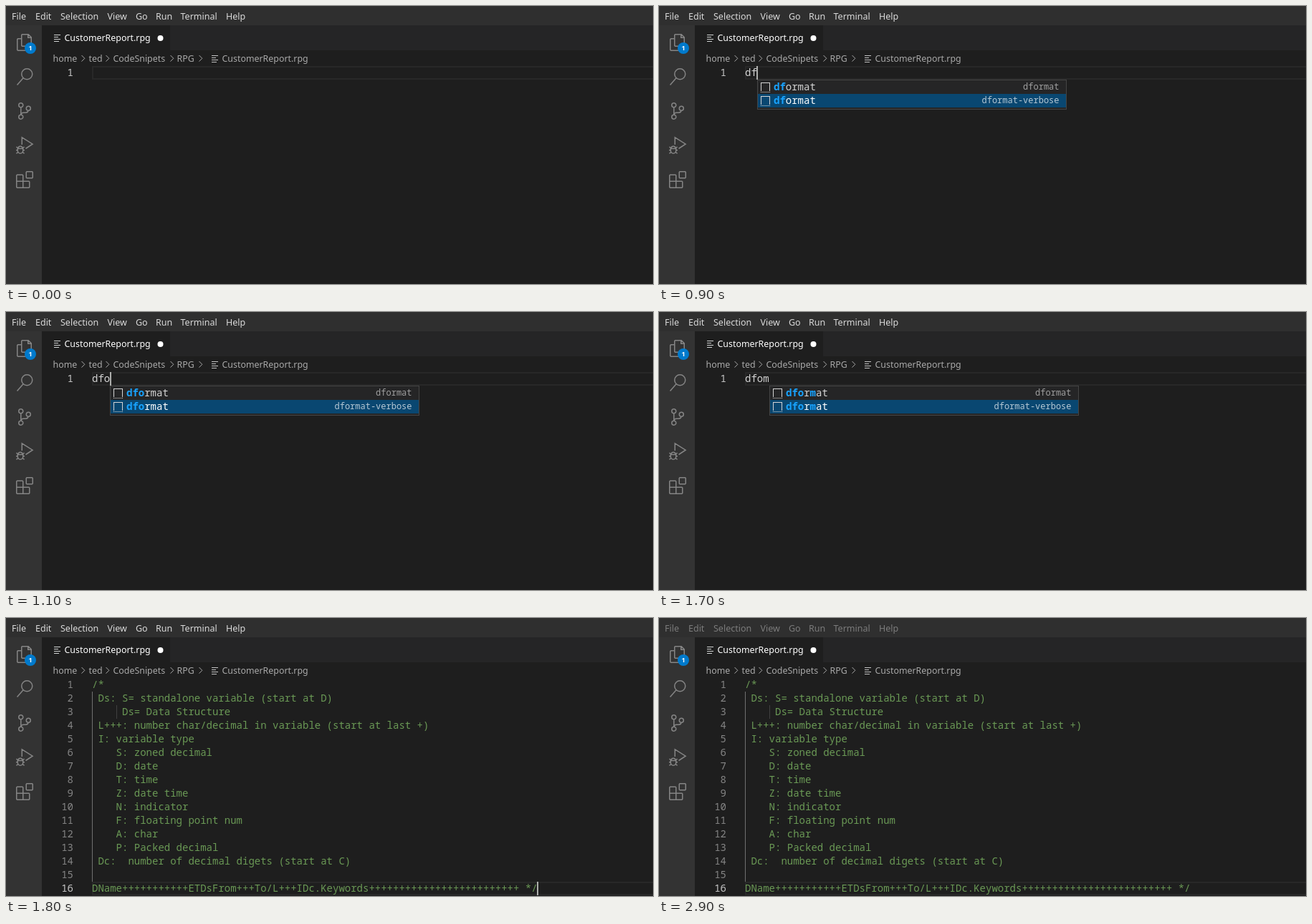
These frames come from a looping animation (903 by 389 pixels, 3 s). An HTML page with a canvas:

```html
<!DOCTYPE html>
<html lang="en">
<head>
<meta charset="utf-8">
<title>Editor snippet</title>
<style>
html, body { margin: 0; width: 100%; height: 100%; overflow: hidden; background: #1e1e1e; }
canvas { display: block; }
</style>
</head>
<body>
<canvas id="stage" width="903" height="389"></canvas>
<script>
const ctx = document.getElementById('stage').getContext('2d', { alpha: false });
const W = 903, H = 389, LOOP = 3000;
const LEFT = 120, TOP = 84, LINE = 19, BASE = 14, CHAR = 8.4;
const UI = '"Noto Sans", "Open Sans", sans-serif';
const MONO = '"Noto Sans Mono", "DejaVu Sans Mono", monospace';
const FILE = 'CustomerReport.rpg';

const STEPS = [
  { at: 0, typed: '', caret: false },
  { at: 500, typed: 'd', caret: true },
  { at: 900, typed: 'df', caret: true },
  { at: 1100, typed: 'dfo', caret: true },
  { at: 1200, typed: 'dfom', caret: true },
  { at: 1700, typed: 'dfom', caret: false },
  { at: 1800, done: true, caret: true },
  { at: 2300, done: true, caret: false },
  { at: 2800, done: true, caret: true },
  { at: 2900, done: true, caret: false, blurred: true }
];

const SNIPPET = [
  '/*',
  ' Ds: S= standalone variable (start at D)',
  '     Ds= Data Structure',
  ' L+++: number char/decimal in variable (start at last +)',
  ' I: variable type',
  '    S: zoned decimal',
  '    D: date',
  '    T: time',
  '    Z: date time',
  '    N: indicator',
  '    F: floating point num',
  '    A: char',
  '    P: Packed decimal',
  ' Dc:  number of decimal digets (start at C)',
  '',
  'DName' + '+'.repeat(11) + 'ETDsFrom+++To/L+++IDc.Keywords' + '+'.repeat(25) + ' */'
];

const ITEMS = [
  ['dformat', 'dformat'],
  ['dformat', 'dformat-verbose'],
  ['do', 'do'],
  ['dow', 'dow']
];

const MENU = [
  ['File', 8], ['Edit', 41], ['Selection', 76], ['View', 141.5],
  ['Go', 181], ['Run', 209], ['Terminal', 243.5], ['Help', 307]
];

const CRUMBS = [['home', 65.5], ['ted', 115.5], ['CodeSnipets', 149.5], ['RPG', 238.5], [FILE, 301.5]];

// Side bar icons, each on a 24 unit grid
const ICONS = [
  'M8.5.75h8.7l4.05 4.05v11.8l-.8.65H8.6l-.85-.85V1.5zM16.75.75v4.5h4.5' +
    'M7.75 6.75H2.6l-.85.85v14.9l.9.75h12l.6-.7v-5.3',
  'M7.75 8.25a7.5 7.5 0 1 0 15 0a7.5 7.5 0 1 0-15 0M9.8 14.1L1.56 23.4',
  'M3.8 3.75a3 3 0 1 0 6 0a3 3 0 1 0-6 0M3.8 20.2a3 3 0 1 0 6 0a3 3 0 1 0-6 0' +
    'M14.27 8.2a3 3 0 1 0 6 0a3 3 0 1 0-6 0M6.8 6.75v10.5' +
    'M17.2 11.2c-.5 1.9-1.8 3-3.7 3h-3c-2 0-3.4 1.2-3.6 3',
  'M8.25 11V.75L23.1 10.2L13.5 16.5' +
    'M2.25 16.5v3C2.6 21.7 4.2 23.25 6 23.25S9.4 21.7 9.75 19.5v-3z' +
    'M3 16.2a3 3 0 0 1 6 0M.5 14l2.2 2.2M11.5 14l-2.2 2.2' +
    'M0 18.75h2.25M9.75 18.75H12M.5 23.5l2-2M11.5 23.5l-2-2',
  'M15 .75h7.5l.75.75V9l-.75.75H15L14.25 9V1.5z' +
    'M.75 14.25V6l.75-.75H9l.75.75v17.25M.75 14.25H18l.75.75v7.5l-.75.75H1.5l-.75-.75z'
].map(d => new Path2D(d));

function box(x, y, w, h, color) {
  ctx.fillStyle = color;
  ctx.fillRect(x, y, w, h);
}

function text(str, x, y, font, color, align = 'left') {
  ctx.font = font;
  ctx.fillStyle = color;
  ctx.textAlign = align;
  ctx.fillText(str, x, y);
}

function disc(x, y, r, color) {
  ctx.fillStyle = color;
  ctx.beginPath();
  ctx.arc(x, y, r, 0, Math.PI * 2);
  ctx.fill();
}

function fileIcon(x, y, color) {
  [9, 6, 9, 7].forEach((w, i) => box(x, y + i * 3, w, 1, color));
}

function sideBar() {
  box(0, 27, 50, H - 27, '#333333');
  ctx.strokeStyle = '#858585';
  ctx.lineWidth = 1.5;
  ICONS.forEach((icon, i) => {
    ctx.save();
    ctx.translate(14, 39 + i * 48);
    ctx.stroke(icon);
    ctx.restore();
  });
  disc(34, 59, 8, '#007acc');
  text('1', 34, 62.3, '600 9px ' + UI, '#ffffff', 'center');
}

function header(blurred) {
  box(0, 0, W, 27, '#2f2f2f');
  for (const [name, x] of MENU) text(name, x, 19, '12.5px ' + UI, blurred ? '#7c7c7c' : '#dadada');

  box(50, 27, W - 50, 35, '#252526');
  box(50, 27, 179, 35, '#1e1e1e');
  fileIcon(67, 40, '#d4d7d6');
  text(FILE, 81.5, 49, '12.4px ' + UI, '#ffffff');
  disc(215.5, 45, 4, '#ffffff');

  for (const [name, x] of CRUMBS) text(name, x, 78, '12.4px ' + UI, '#a9a9a9');
  fileIcon(287, 69, '#c5c5c5');
  ctx.strokeStyle = '#a9a9a9';
  ctx.lineWidth = 1;
  for (const x of [105.5, 139.5, 229.5, 269.5]) {
    ctx.beginPath();
    ctx.moveTo(x, 69);
    ctx.lineTo(x + 4.3, 73.3);
    ctx.lineTo(x, 77.6);
    ctx.stroke();
  }
}

function editor(lines, color, caret) {
  const last = lines.length - 1;
  const y = TOP + last * LINE;
  box(LEFT, y, W - LEFT, LINE, '#282828');
  box(LEFT + 2, y + 2, W - LEFT - 2, LINE - 4, '#1e1e1e');

  if (last > 0) {
    box(LEFT, TOP + LINE, 1, (last - 1) * LINE, '#707070');
    box(LEFT + 34, TOP + 2 * LINE, 1, LINE, '#404040');
  }
  lines.forEach((line, i) => {
    const base = TOP + i * LINE + BASE;
    text(i + 1, 94, base, '14px ' + MONO, i === last ? '#c6c6c6' : '#858585', 'right');
    text(line, LEFT, base, '14px ' + MONO, color);
  });
  if (caret) box(Math.floor(LEFT + lines[last].length * CHAR), y, 2, LINE, '#aeafad');
}

function snippetIcon(x, y) {
  const color = '#d4d4d4';
  box(x, y, 13, 1, color);
  box(x, y, 1, 12, color);
  box(x + 12, y, 1, 12, color);
  for (let i = 0; i < 7; i++) box(x + i * 2, y + 13, 1, 1, color);
}

// Bolds the letters that the typed word matches in order
function label(word, typed, x, y, color) {
  let hit = 0;
  [...word].forEach((ch, i) => {
    const match = ch === typed[hit];
    if (match) hit++;
    text(ch, x + i * CHAR, y, (match ? 'bold ' : '') + '14px ' + MONO, match ? '#18a3ff' : color);
  });
}

function popup(typed) {
  const items = typed === 'd' ? ITEMS : ITEMS.slice(0, 2);
  const x = Math.round(LEFT + typed.length * CHAR);
  const y = TOP + LINE;
  const h = items.length * LINE + 4;
  box(x, y, 432, h, '#454545');
  box(x + 1, y + 1, 430, h - 2, '#252526');
  items.forEach(([word, detail], i) => {
    const top = y + 1 + i * LINE;
    const active = i === 1;
    if (active) box(x + 1, top, 430, LINE, '#094771');
    snippetIcon(x + 5, top + 3);
    label(word, typed, x + 23, top + BASE, active ? '#ffffff' : '#d4d4d4');
    text(detail, x + 421.5, top + BASE - 1, '12px ' + MONO,
      active ? 'rgba(255,255,255,.7)' : 'rgba(212,212,212,.7)', 'right');
  });
}

function draw(now) {
  const t = now % LOOP;
  const step = STEPS.filter(s => s.at <= t).pop();
  box(0, 0, W, H, '#1e1e1e');
  header(step.blurred);
  sideBar();
  if (step.done) {
    editor(SNIPPET, '#6a9955', step.caret);
  } else {
    editor([step.typed], '#d4d4d4', step.caret);
    if (step.typed) popup(step.typed);
  }
}

const start = performance.now();
function tick() {
  draw(performance.now() - start);
  requestAnimationFrame(tick);
}
tick();
</script>
</body>
</html>
```
